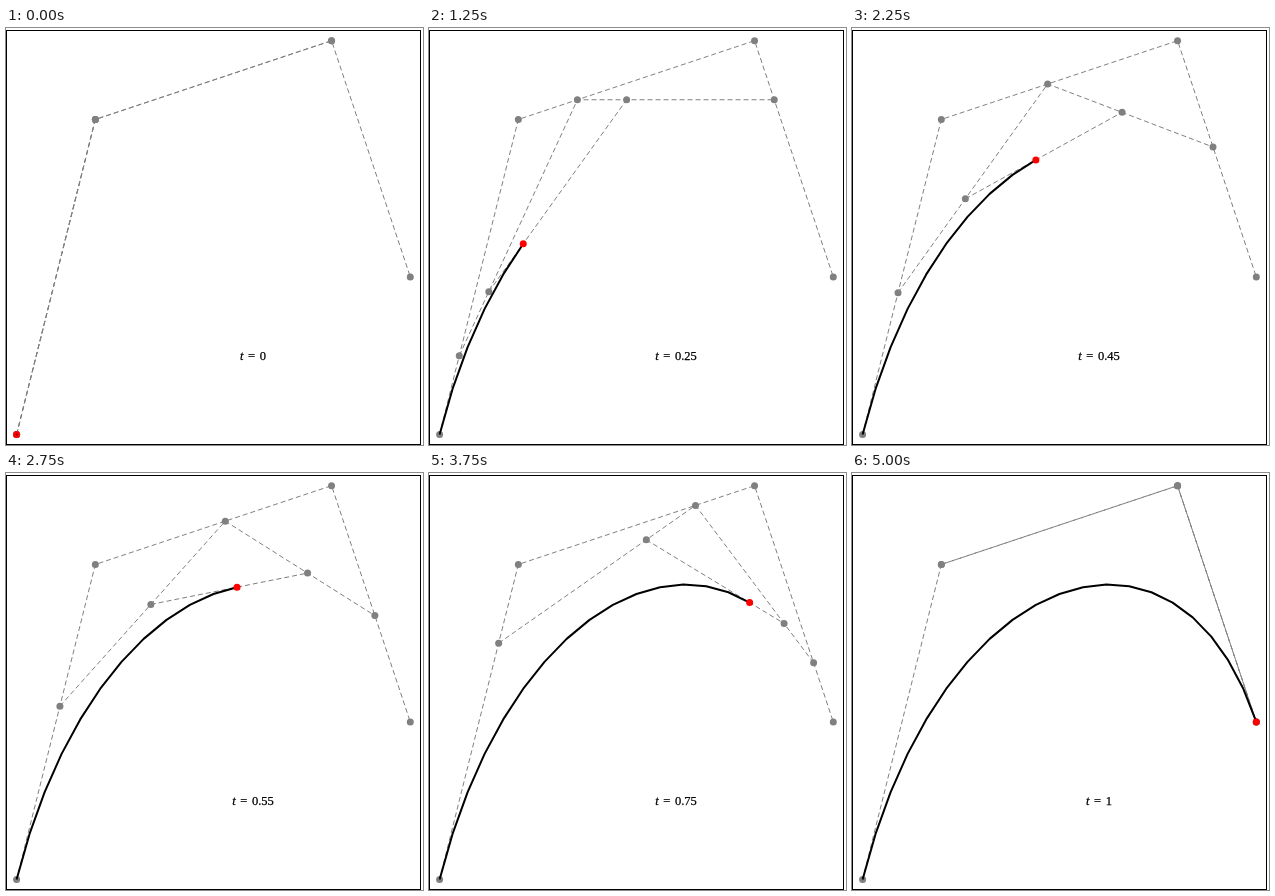
Recreate the animation shown at these times as an HTML page. Size 417 by 417 pixels, loop 5.25 s.

```html
<!DOCTYPE html>
<html>
<head>
<meta charset="utf-8">
<style>
  html, body { margin: 0; width: 100%; height: 100%; overflow: hidden; background: #fff; }
  svg { display: block; width: 100%; height: 100%; }
  polyline, rect { fill: none; stroke: #000; }
  .guide { stroke: #808080; stroke-dasharray: 5 3; }
  .dot { fill: #808080; }
  text { font: 12.5px "Liberation Serif", "Times New Roman", serif; word-spacing: 1.5px;
         text-anchor: middle; stroke: #000; stroke-width: .25px; }
  tspan { font-style: italic; }
</style>
</head>
<body>
<svg viewBox="0 0 417 417">
  <rect x=".5" y="2.5" width="414" height="414"/>
  <g id="guides"></g>
  <polyline id="curve" stroke-width="2" stroke-linejoin="round"/>
  <circle id="tip" r="3.5" fill="#f00"/>
  <circle id="core" r="1" fill="#700"/>
  <text x="247" y="332"><tspan>t</tspan> = <tspan id="value" style="font-style:normal"></tspan></text>
</svg>
<script>
const STEP_MS = 250, STEPS = 20, UNIT = 39.37;
const get = id => document.getElementById(id);
const control = [[0, 0], [2, 8], [8, 10], [10, 4]]
  .map(([x, y]) => [10.6 + x * UNIT, 406.4 - y * UNIT]);

const between = (a, b, t) => a.map((v, i) => v + (b[i] - v) * t);
const reduce = (pts, t) => pts.slice(1).map((p, i) => between(pts[i], p, t));

// De Casteljau levels, from the control polygon down to the curve point
function levels(t) {
  const all = [control];
  while (all.at(-1).length > 1) all.push(reduce(all.at(-1), t));
  return all;
}

const line = pts => `<polyline class="guide" points="${pts.join(' ')}"/>`;
const dot = ([x, y]) => `<circle class="dot" cx="${x}" cy="${y}" r="3.5"/>`;

function place(el, [x, y]) {
  el.setAttribute('cx', x);
  el.setAttribute('cy', y);
}

function draw(step) {
  const t = step / STEPS, all = levels(t), [tip] = all.pop();
  get('guides').innerHTML = all.map(line).join('') + all.flat().map(dot).join('');
  const path = Array.from({ length: step + 1 }, (_, i) => levels(i / STEPS)[3][0]);
  get('curve').setAttribute('points', path.join(' '));
  place(get('tip'), tip);
  place(get('core'), tip);
  get('core').style.display = step ? 'none' : '';
  get('value').textContent = +t.toFixed(2);
}

let shown = -1;
const start = performance.now();
function tick() {
  const step = Math.floor((performance.now() - start) / STEP_MS) % (STEPS + 1);
  if (step !== shown) draw(shown = step);
  requestAnimationFrame(tick);
}
tick();
</script>
</body>
</html>
```
